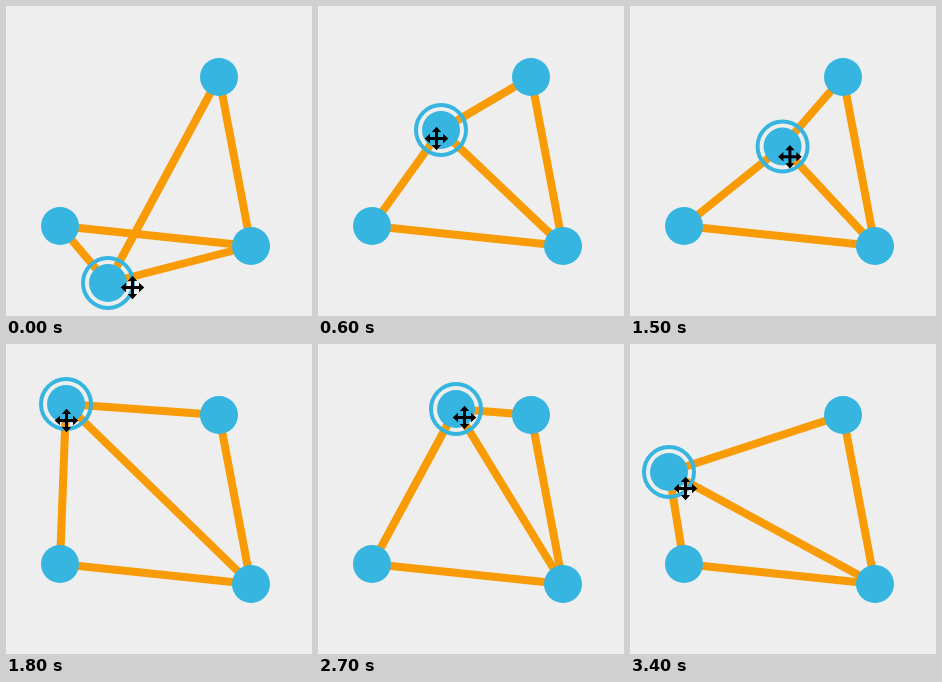
Write an HTML page that moves like this. It is 306x310 px and loops after 3500 ms.

```html
<!DOCTYPE html>
<html lang="en">
<head>
<meta charset="utf-8">
<title>Draggable graph</title>
<style>
  html, body { margin: 0; width: 100%; height: 100%; overflow: hidden; background: #eee; }
  svg { display: block; }
  .edge { stroke: #f89b05; stroke-width: 8; }
  .node { fill: #35b5e0; }
  .ring { fill: none; stroke: #35b5e0; stroke-width: 4; }
</style>
</head>
<body>
<svg width="306" height="310" viewBox="0 0 306 310">
  <g id="edges"></g>
  <g id="nodes"></g>
  <g id="dragged">
    <circle class="ring" r="25"/>
    <circle class="node" r="19"/>
  </g>
  <g id="pointer">
    <path id="arm" d="M-1.5 0V-6.5H-4.7L0-11.8L4.7-6.5H1.5V0Z"/>
    <use href="#arm" transform="rotate(90)"/>
    <use href="#arm" transform="rotate(180)"/>
    <use href="#arm" transform="rotate(270)"/>
  </g>
</svg>
<script>
const LOOP = 3500, STEP = 100;
const left = { x: 54, y: 220 }, upper = { x: 213, y: 71 }, right = { x: 245, y: 240 };
const corners = [left, upper, right];

// A point on the drag path; dx, dy is how far the pointer sits from the node.
const via = (at, x, y, dx = 9, dy = 9) => ({ at, x, y, dx, dy });

const path = [
  via(0, 102, 277, 24, 4),
  via(300, 84, 145),
  via(600, 123, 124, -5, 8),
  via(700, 49, 165),
  via(900, 212, 230, 25, 17),
  via(1100, 80, 118),
  via(1200, 114, 110, 27, 11),
  via(1450, 160, 148),
  via(1800, 60, 60, 0, 16),
  via(2000, 33, 106),
  via(2300, 114, 121, 17, 11),
  via(2700, 138, 65, 8, 8),
  via(3000, 69, 56),
  via(3400, 39, 128, 16, 16)
];

const byId = id => document.getElementById(id);

function add(parent, tag, attrs) {
  const el = document.createElementNS("http://www.w3.org/2000/svg", tag);
  for (const name in attrs) el.setAttribute(name, attrs[name]);
  return byId(parent).appendChild(el);
}

const addEdge = (a, b) =>
  add("edges", "line", { class: "edge", x1: a.x, y1: a.y, x2: b.x, y2: b.y });

addEdge(left, right);
addEdge(upper, right);
const spokes = corners.map(corner => addEdge(corner, corner));
corners.forEach(({ x, y }) => add("nodes", "circle", { class: "node", cx: x, cy: y, r: 19 }));

function slope(i, axis) {
  const before = path[i - 1], after = path[i + 1];
  return before && after ? (after[axis] - before[axis]) / (after.at - before.at) : 0;
}

// Smooth curve through the path points (cubic Hermite).
function sample(time, axis) {
  const i = Math.max(0, path.findLastIndex(p => p.at <= time));
  const a = path[i], b = path[i + 1];
  if (!b) return a[axis];
  const span = b.at - a.at, k = (time - a.at) / span, rest = 1 - k;
  return rest * rest * (1 + 2 * k) * a[axis] + k * k * (3 - 2 * k) * b[axis]
    + span * k * rest * (rest * slope(i, axis) - k * slope(i + 1, axis));
}

const moveTo = (id, x, y) => byId(id).setAttribute("transform", `translate(${x} ${y})`);

function render(time) {
  const stepped = Math.floor((time % LOOP) / STEP) * STEP;
  const [x, y, dx, dy] = ["x", "y", "dx", "dy"].map(axis => sample(stepped, axis));
  for (const spoke of spokes) {
    spoke.setAttribute("x2", x);
    spoke.setAttribute("y2", y);
  }
  moveTo("dragged", x, y);
  moveTo("pointer", x + dx + 0.5, y + dy + 0.5);
}

const start = performance.now();
function tick() {
  render(performance.now() - start);
  requestAnimationFrame(tick);
}
tick();
</script>
</body>
</html>
```
